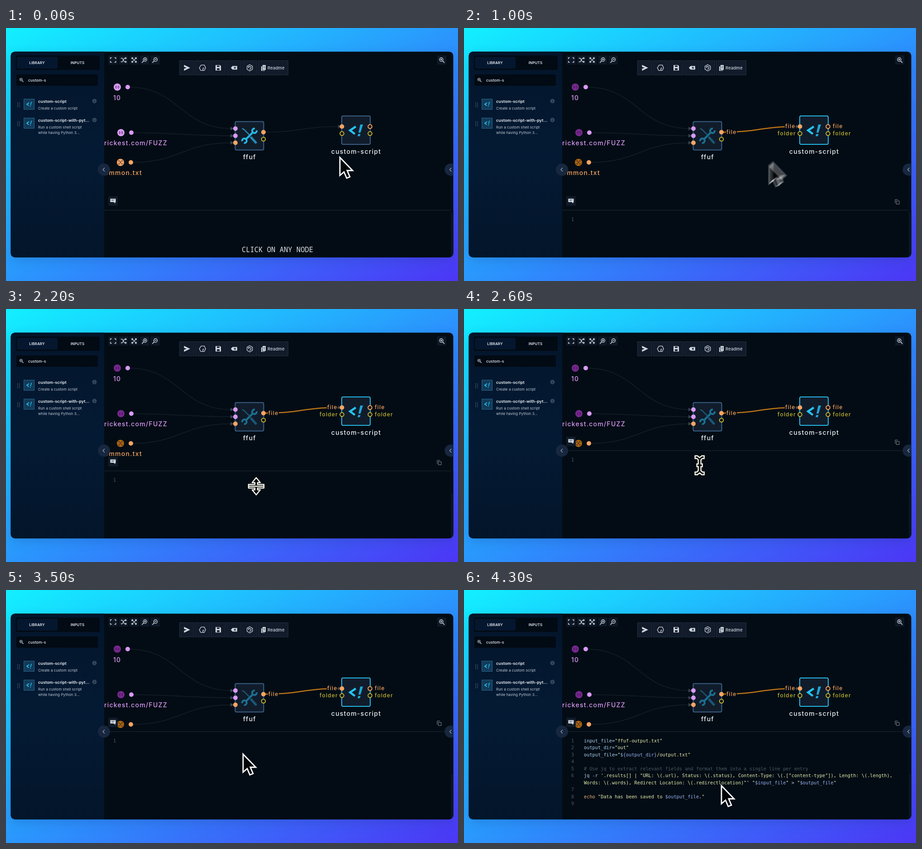
Recreate the animation shown at these times as an HTML page. Size 999 by 561 pixels, loop 4400 ms.

```html
<!DOCTYPE html>
<html lang="en">
<head>
<meta charset="utf-8">
<title>Workflow editor</title>
<style>
  html, body { margin: 0; width: 100%; height: 100%; overflow: hidden; }
  body { background: linear-gradient(to bottom right, #12f0ff, #2a97fd 50%, #4c36f5); }
  svg { display: block; width: 100%; height: 100%; }
  text { font-family: Inter, sans-serif; white-space: pre; }
  .shadow { filter: drop-shadow(0 8px 12px rgba(10, 20, 90, .16)); }
  .label { font-size: 14px; font-weight: 500; letter-spacing: 1.25px; fill: #eef2f6; }
  .port { font-size: 12px; font-weight: 500; letter-spacing: 1.2px; }
  .pink { fill: #d99af5; } .orange { fill: #f5a563; } .yellow { fill: #c0b42f; }
  .ring { stroke-width: 2; }
  .ring.orange { fill: #030c14; stroke: #f5a563; }
  .ring.yellow { fill: #030c14; stroke: #c0b42f; }
  .tab { font-size: 8px; font-weight: 600; letter-spacing: .1px; fill: #e4eaf2; text-anchor: middle; }
  .item { font-size: 9px; font-weight: 600; letter-spacing: .1px; fill: #f0f4f8; }
  .note { font-size: 8px; letter-spacing: .07px; fill: #c3ccd8; }
  .edge { fill: none; stroke: #131e28; stroke-width: 1.6; }
  .icon { fill: none; stroke: #d3dae2; stroke-width: 1.3; }
  .solid { fill: #d3dae2; }
  .code, .num { font: 10.3px "DejaVu Sans Mono", monospace; }
  .num { fill: #4b5862; text-anchor: middle; }
  .v { fill: #acd0f0; } .s { fill: #e6edb0; } .r { fill: #9ab2f2; }
  .k { fill: #f2b273; } .c { fill: #4b5862; } .p { fill: #ccdbe4; }
  .hint { font: 15.5px "Noto Sans Mono", monospace; fill: #dfe4e8; text-anchor: middle; }
</style>
</head>
<body>
<svg viewBox="0 0 999 561" preserveAspectRatio="none">
  <defs>
    <clipPath id="frame"><rect x="10.500" y="52.500" width="978" height="456" rx="9"/></clipPath>
    <clipPath id="work"><rect x="217" y="52" width="772" height="457"/></clipPath>
    <linearGradient id="side" x2="0" y2="1">
      <stop stop-color="#03152a"/><stop offset=".5" stop-color="#041a34"/><stop offset="1" stop-color="#03152a"/>
    </linearGradient>
    <g id="script" fill="none">
      <path d="M0 -8.500L-12.500 0L-2 8" stroke="#25c3ee" stroke-width="4.600"/>
      <path d="M10 -13h6l-5.500 18h-4.500zM5.500 8h5l-1.500 5h-5z" fill="#1fa5d6"/>
    </g>
    <g id="tools">
      <path d="M-8 8L8 -8" stroke="#25b7e6" stroke-width="4.500"/>
      <path d="M16 -12A5 5 0 1 1 12 -16M-16 12A5 5 0 1 1 -12 16" fill="none" stroke="#25b7e6" stroke-width="4"/>
      <path d="M-16 -16L-12 -14L1 -1" fill="none" stroke="#2b93bb" stroke-width="2.200"/>
      <path d="M4 4L14 15" stroke="#2589b4" stroke-width="5" stroke-linecap="round"/>
    </g>
    <g id="zoom" class="icon"><circle cx="1" cy="-1" r="4"/><path d="M-2 2L-6 6M-1 -1h4" stroke-width="1.700"/></g>
    <path id="arrow" d="M0 0V40L9 32L15 46L22 43L16 29H28Z" fill="#020508" stroke="#fff" stroke-width="2.800"/>
    <g id="resize" fill="#060b10" stroke="#f5f5e8" stroke-width="2.500" stroke-linejoin="round">
      <path d="M0 -19L9 -8H3V-4H17V0H-17V-4H-3V-8H-9ZM0 19L9 8H3V4H17V0H-17V4H-3V8H-9Z"/>
    </g>
    <path id="ibeam" d="M-10 -21H-5L0 -17L5 -21H10V-15H6L3 -12V-3H6V3H3V12L6 15H10V21H5L0 17L-5 21H-10V15H-6L-3 12V3H-6V-3H-3V-12L-6 -15H-10Z" fill="#060b10" stroke="#f5f5e8" stroke-width="2.500"/>
  </defs>
  <rect class="shadow" x="10.500" y="52.500" width="978" height="456" rx="9" fill="#030c14"/>
  <g clip-path="url(#frame)">
    <g clip-path="url(#work)">
      <g id="graph"></g>
      <g id="panel">
        <rect x="217" width="772" height="300" fill="#030c14"/>
        <path d="M217 0H983" stroke="#14202b" stroke-width="1.500"/>
        <rect x="226" y="-31" width="21" height="21" fill="#0f1a28"/>
        <path d="M230.500 -25.500h12v7.500h-1v3l-3.500 -3h-7.500z" class="solid"/>
        <path d="M233 -23h7M233 -21h5" stroke="#293646" stroke-width=".8"/>
        <g id="editor">
          <path d="M953 -15.500v-8h6M955.500 -13.500v-7h6.500v7z" class="icon" style="stroke:#7c8994;stroke-width:1"/>
          <text class="num" x="240" y="23.500">1</text>
          <rect id="caret" x="264.500" y="12" width="1" height="15" fill="#8a8578"/>
          <g id="code"></g>
        </g>
      </g>
      <text id="hint" class="hint" x="600" y="496.500">CLICK ON ANY NODE</text>
      <path d="M983.500 53V508" stroke="#0b1521"/>
      <rect x="984" y="409" width="5" height="100" fill="#0b1520"/>
    </g>
    <rect x="10" y="52" width="207" height="457" fill="url(#side)"/>
    <g id="sidebar"></g>
    <g id="toolbar"></g>
    <g id="handles"></g>
  </g>
  <g id="cursor"></g>
</svg>
<script>
const $ = id => document.getElementById(id);
const dot = (x, y, color, r = 5) => `<circle class="${color}" cx="${x}" cy="${y}" r="${r}"/>`;
const ring = (x, y, color) => dot(x, y, 'ring ' + color, 4.3);
const disc = (x, y, r, fill) => `<circle cx="${x}" cy="${y}" r="${r}" fill="${fill}"/>`;
const text = (x, y, cls, str, extra = '') => `<text class="${cls}" x="${x}" y="${y}" ${extra}>${str}</text>`;
const box = (x, y, w, h, fill, extra = '') =>
  `<rect x="${x}" y="${y}" width="${w}" height="${h}" fill="${fill}" ${extra}/>`;
const at = (x, y, body, scale = 1) => `<g transform="translate(${x} ${y}) scale(${scale})">${body}</g>`;
const use = (id, extra = '') => `<use href="#${id}" ${extra}/>`;
const icon = (d, extra = '') => `<path class="icon" d="${d}" ${extra}/>`;
const solid = (d, extra = '') => `<path class="solid" d="${d}" ${extra}/>`;
const wire = (x1, y1, x2, y2) => {
  const mid = (x1 + x2) / 2;
  return `M${x1} ${y1}C${mid} ${y1} ${mid} ${y2} ${x2} ${y2}`;
};

function buildGraph() {
  const inputs = [[246, 131, 'pink', 223], [254, 232, 'pink', 239], [253, 298, 'orange', 254.5]];
  const head = (x, y) => `<path d="M${x} ${y - 4}l7 4l-7 4z" fill="#34444f"/>`;
  const edges = inputs.map(([x, y, , end]) =>
    `<path class="edge" d="${wire(x + 24, y, 499, end)}"/>` + head(496, end)).join('');
  const sources = inputs.map(([x, y, color]) => {
    const glyph = color === 'pink'
      ? 'M-2 -3Q-5 0 -2 3M2 -3Q5 0 2 3M-1 0H1'
      : 'M-2 -2.500L2 2.500M2 -2.500L-2 2.500M-4 -2V-4H-2M2 -4H4V-2M-4 2V4H-2M2 4H4V2';
    return dot(x, y, color + ' source', 8) +
      at(x, y, `<path d="${glyph}" fill="none" stroke="#321c33" stroke-width="1.100"/>`) +
      dot(x + 23, y, color);
  }).join('');
  const node = (x, y, id) =>
    box(x, y, 63, 63, '#111c2b', `id="${id}" rx="3" stroke="#3b6088" stroke-width="2"`);
  const patch = x => box(x, 212, 24, 26, '#030c14');

  $('graph').innerHTML = edges + sources +
    text(237, 160, 'label pink', '10') +
    text(357, 260, 'label pink', 'rickest.com/FUZZ', 'text-anchor="end"') +
    text(301, 326, 'label orange', 'common.txt', 'text-anchor="end"') +
    `<path id="link" class="edge" d="${wire(569, 231, 737, 218.5)}"/>` + head(734, 218.5) +
    node(506.5, 207.5, 'first') + at(538, 239, use('tools', 'id="firstIcon"')) +
    node(742, 195, 'second') + at(773, 227, use('script')) +
    `<g id="ports">${patch(579)}${patch(709)}` +
      text(580, 234.5, 'port orange', 'file') + text(710, 222, 'port orange', 'file') +
      text(693, 237.5, 'port yellow', 'folder') + text(815, 222, 'port orange', 'file') +
      text(815, 237.5, 'port yellow', 'folder') + '</g>' +
    dot(507, 223, 'pink') + dot(507, 239, 'pink') + dot(507, 254.5, 'orange') +
    dot(569, 231, 'orange') + ring(569, 246.5, 'yellow') +
    dot(742.5, 218.5, 'orange') + ring(742.5, 234, 'yellow') +
    ring(804.5, 218.5, 'orange') + ring(804.5, 234, 'yellow') +
    text(538.5, 291, 'label', 'ffuf', 'text-anchor="middle"') +
    text(774, 279, 'label', 'custom-script', 'text-anchor="middle"');
}

function buildSidebar() {
  const item = (y, title, lines) => {
    let grip = '';
    for (let i = 0; i < 8; i++) grip += box(25 + i % 2 * 4, y - 4 + (i >> 1) * 3, 1.5, 1.5, '#52647a');
    return grip + box(39.5, y - 11.5, 23, 23, '#123b59', 'stroke="#28658a"') +
      at(51, y, use('script'), .4) +
      text(71, y - 3, 'item', title) +
      lines.map((line, i) => text(71, y + 11.5 + i * 12, 'note', line)).join('') +
      disc(195.5, y - 7, 5, '#34465b') +
      text(195.5, y - 4.5, 'tab', 'i', 'style="fill:#04152a;font-size:7px"');
  };
  $('sidebar').innerHTML =
    box(22, 61, 185, 32, '#020a14', 'rx="3"') + box(24, 64, 90, 26, '#05172f', 'rx="3"') +
    text(68.5, 79.5, 'tab', 'LIBRARY') + text(158, 79.5, 'tab', 'INPUTS') +
    box(23, 103, 180, 25, '#020a14', 'rx="2"') +
    at(34, 115, use('zoom', 'transform="scale(-.75 .75)"')) +
    text(49, 118.5, 'item', 'custom-s', 'style="font-size:8.500px;font-weight:500"') +
    item(169, 'custom-script', ['Create a custom script']) +
    item(211, 'custom-script-with-pyt...', ['Run a custom shell script', 'while having Python 3...']);
}

function buildToolbar() {
  const small = [
    icon('M-6 -2V-5H-3M3 -5H6V-2M-6 2V5H-3M3 5H6V2'),
    icon('M-6 -4H-3L2 4H6M-6 4H-3L2 -4H6M4 -6L6 -4L4 -2M4 6L6 4L4 2'),
    icon('M-5 -5L5 5M5 -5L-5 5M-5 -2V-5H-2M2 -5H5V-2M-5 2V5H-2M2 5H5V2'),
    use('zoom') + icon('M1 -3V1'), use('zoom')
  ];
  const large = [
    solid('M-6 -6.500L7.500 0L-6 6.500V2L0 0L-6 -2Z'),
    icon('M-3 -6H4L7 0L4 6H1V1H4M-3 -6L-7 0L-4 6H1'),
    solid('M-6 -6H4L6 -4V6H-6ZM-3 -5V-2H3V-5ZM-3 1V5H3V1Z', 'fill-rule="evenodd"'),
    solid('M-7 0L-3 -4H7V4H-3Z') + '<path d="M0 -2L4 2M4 -2L0 2" stroke="#152031" stroke-width="1.300"/>',
    icon('M0 -7L6 -3.500V3.500L0 7L-6 3.500V-3.500ZM-3 -1A3 3 0 1 1 -1 3M-3 -3V-1H-1')
  ];
  const frame = (x, w) => box(x, 72.5, w, 31.5, '#111b2a', 'stroke="#233146"');
  $('toolbar').innerHTML =
    small.map((body, i) => box(226.5 + i * 23.2, 61, 20.5, 20, '#0e1826') + at(236.7 + i * 23.2, 71, body)).join('') +
    large.map((body, i) => frame(383.5 + i * 34.8, 32) + at(399.5 + i * 34.8, 88.2, body)).join('') +
    frame(557.5, 66) + at(569, 88, solid('M-2 -6H5V5H-2ZM-5 -3H-3V6H3V7H-5Z') +
      '<path d="M0 -3H3M0 -1H3M0 1H3" stroke="#334052"/>') +
    text(578, 91.5, 'item', 'Readme', 'style="font-size:9.500px;font-weight:500;fill:#cbd3dc"') +
    box(953, 61, 20, 20, '#0e1826') +
    at(963, 71, `<g transform="scale(-1 1)">${use('zoom')}${icon('M1 -3V1')}</g>`);
  $('handles').innerHTML = [216.5, 983].map(x => disc(x, 314, 13.6, '#17273f') +
    at(x, 314, icon('M1.500 -4L-2.500 0L1.500 4', 'style="stroke:#a3b0c0;stroke-width:1.100"'))).join('');
}

function buildCode() {
  const raw = String.raw;
  const lines = [
    [1, 'v', 'input_file=', 's', '"ffuf-output.txt"'],
    [2, 'v', 'output_dir=', 's', '"out"'],
    [3, 'v', 'output_file=', 's', '"', 'r', '${output_dir}', 's', '/output.txt"'],
    [4],
    [5, 'c', '# Use jq to extract relevant fields and format them into a single line per entry'],
    [6, 'v', 'jq -r ', 's', raw`'.results[] | "URL: \(.url), Status: \(.status), Content-Type: \(.["content-type"]), Length: \(.length),`],
    ['', 's', raw`Words: \(.words), Redirect Location: \(.redirectlocation)"' "`, 'r', '$input_file',
      's', '"', 'p', ' &gt; ', 's', '"', 'r', '$output_file', 's', '"'],
    [7],
    [8, 'k', 'echo ', 's', '"Data has been saved to ', 'r', '$output_file', 's', '."'],
    [9]
  ];
  $('code').innerHTML = lines.map(([num, ...parts], i) => {
    const y = 23.5 + i * 15.5;
    let spans = '';
    for (let j = 0; j < parts.length; j += 2) spans += `<tspan class="${parts[j]}">${parts[j + 1]}</tspan>`;
    return (i ? text(240, y, 'num', num) : '') + text(265, y, 'code', spans);
  }).join('');
}

// Each step: time, then values; eased between neighbours.
const cursorPath = [[0, 738, 287], [300, 768, 228], [600, 768, 228], [1500, 554, 405], [1900, 554, 405],
  [2200, 553, 393], [2700, 517, 341], [3200, 517, 341], [3500, 524, 364], [4100, 569, 434]];
const panelPath = [[1900, 404], [2500, 314]];
const shapes = [[0, 'arrow'], [1700, 'resize'], [2600, 'ibeam'], [3200, 'arrow']];
const LOOP = 4400, SELECT = 500, PASTE = 3800, SHUTTER = 30, GHOSTS = 10;

function tween(steps, t) {
  const next = steps.findIndex(s => s[0] > t);
  if (next === 0) return steps[0].slice(1);
  if (next < 0) return steps.at(-1).slice(1);
  const a = steps[next - 1], b = steps[next];
  const u = (t - a[0]) / (b[0] - a[0]), ease = u * u * (3 - 2 * u);
  return a.slice(1).map((v, i) => v + (b[i + 1] - v) * ease);
}

// A fast arrow is smeared over a short shutter time.
function drawCursor(t) {
  const shape = shapes.findLast(s => s[0] <= t)[1];
  const [x, y] = tween(cursorPath, t);
  const [px, py] = tween(cursorPath, t - SHUTTER / 2);
  const blurred = t > 0 && shape === 'arrow' && Math.hypot(x - px, y - py) > 4;
  const count = blurred ? GHOSTS : 1;
  let out = '';
  for (let i = 0; i < count; i++) {
    const offset = blurred ? SHUTTER * (i / (count - 1) - .5) : 0;
    const [gx, gy] = tween(cursorPath, t + offset);
    out += use(shape, `x="${gx}" y="${gy}" opacity="${blurred ? .15 : 1}"`);
  }
  $('cursor').innerHTML = out;
}

const show = (id, on) => $(id).style.display = on ? '' : 'none';

function render(t) {
  const selected = t >= SELECT;
  show('hint', !selected);
  show('editor', selected);
  show('ports', selected);
  show('code', t >= PASTE);
  show('caret', t >= 2700 && t < 3300);
  $('second').style.stroke = selected ? '#25b9e8' : '';
  $('firstIcon').style.opacity = selected ? .55 : 1;
  $('link').style.stroke = selected ? '#bd7417' : '';
  $('link').style.strokeWidth = selected ? 2.4 : '';
  document.querySelectorAll('.source').forEach(el => {
    el.style.fill = !selected ? '' : el.classList.contains('pink') ? '#772791' : '#aa650e';
  });
  $('panel').setAttribute('transform', `translate(0 ${tween(panelPath, t)[0]})`);
  drawCursor(t);
}

buildGraph();
buildSidebar();
buildToolbar();
buildCode();

const start = performance.now();
let shown = -1;
function tick() {
  const t = Math.floor((performance.now() - start) % LOOP / 100) * 100;
  if (t !== shown) render(shown = t);
  requestAnimationFrame(tick);
}
tick();
</script>
</body>
</html>
```
